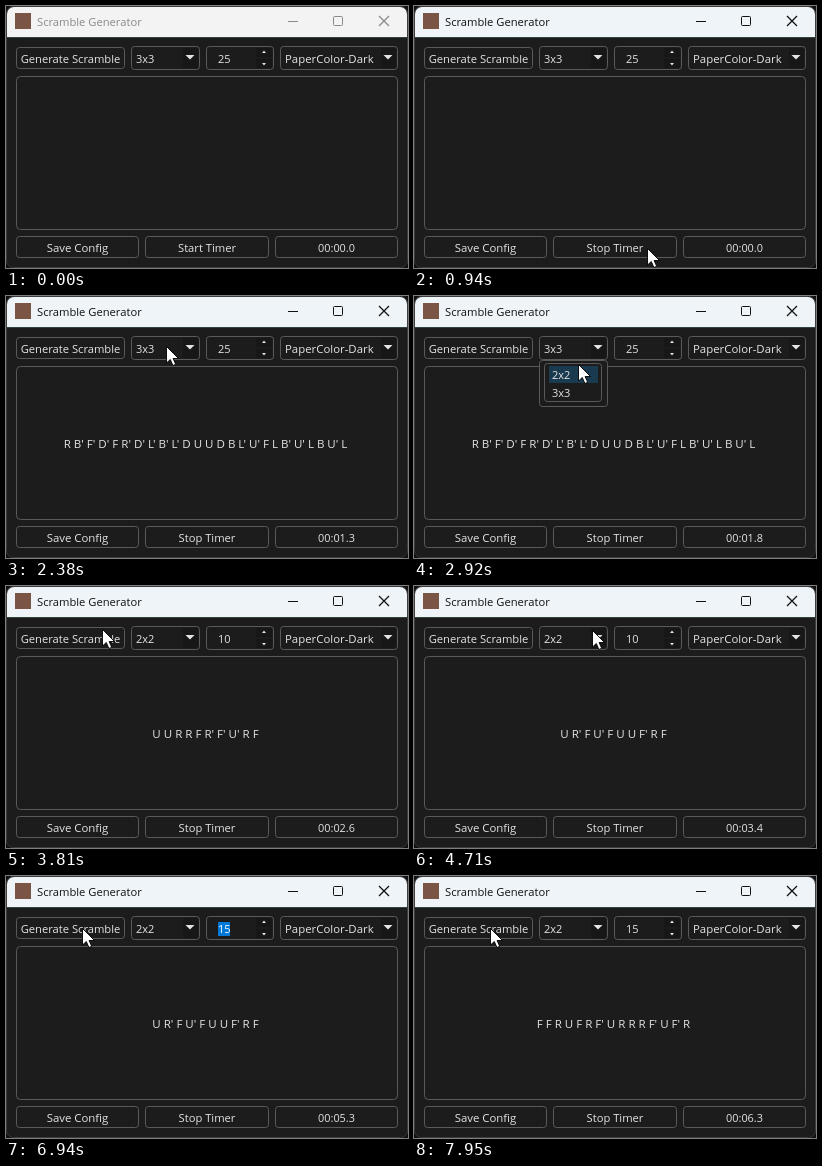
An HTML page with a canvas for the animation above (8000 ms loop, 402x262 px).

```html
<!DOCTYPE html>
<html lang="en">
<head>
<meta charset="utf-8">
<title>Scramble Generator</title>
<style>
html, body { margin: 0; width: 100%; height: 100%; overflow: hidden; background: #1c1c1c; }
canvas { display: block; width: 402px; height: 262px; }
</style>
</head>
<body>
<canvas id="stage" width="402" height="262"></canvas>
<script>
const ctx = document.getElementById('stage').getContext('2d');
const LOOP = 8000, REFRESH = 50, MOVE = 600;
const BODY = '#1c1c1c', EDGE = '#5a5a5a', INK = '#e4e4e4', DARK = '#171717';

// Moments of the clicks, in ms
const START = 846, OPEN = 2580, PICK = 3060, SPIN = 5330, LAST = 7060;

// Where the pointer goes: arrival time, x, y
const stops = [
  [-MOVE, 310, 290],
  [470, 233, 242],
  [1560, 88, 48],
  [2440, 165, 50],
  [2900, 164, 68],
  [3780, 96, 43],
  [5000, 259, 45],
  [6650, 76, 52]
];

const scrambles = [
  [0, ''],
  [1840, "R B' F' D' F R' D' L' B' L' D U U D B L' U' F L B' U' L B U' L"],
  [3670, "U U R R F R' F' U' R F"],
  [4080, "U R' F U' F U U F' R F"],
  [LAST, "F F R U F R F' U R R R F' U F' R"]
];

const clamp = (v, lo, hi) => Math.min(hi, Math.max(lo, v));
const smooth = p => p * p * (3 - 2 * p);

function pointerAt(t) {
  const next = stops.findIndex(s => s[0] > t);
  if (next < 0) return stops[stops.length - 1].slice(1);
  const [left, x0, y0] = stops[next - 1];
  const [arrive, x1, y1] = stops[next];
  const leave = Math.max(left, arrive - MOVE);
  const p = smooth(clamp((t - leave) / (arrive - leave), 0, 1));
  return [x0 + (x1 - x0) * p, y0 + (y1 - y0) * p];
}

function countAt(t) {
  if (t < PICK) return 25;
  return 10 + clamp(Math.floor((t - SPIN) / 170) + 1, 0, 5);
}

// The stopwatch runs a little slower than the playback.
function clockAt(t) {
  const tenths = Math.floor(Math.max(0, t - START) * 0.00887);
  return '00:' + (tenths / 10).toFixed(1).padStart(4, '0');
}

function text(str, x, y, size = 11.4, color = INK, align = 'left') {
  ctx.font = `${size}px "Open Sans", "Noto Sans", sans-serif`;
  ctx.textAlign = align;
  ctx.fillStyle = color;
  ctx.fillText(str, x, y);
}

function fill(color, x, y, w, h) {
  ctx.fillStyle = color;
  ctx.fillRect(x, y, w, h);
}

function frame(x, y, w, h, r = 3, color = EDGE) {
  ctx.strokeStyle = color;
  ctx.lineWidth = 1;
  ctx.beginPath();
  ctx.roundRect(x + 0.5, y + 0.5, w - 1, h - 1, r);
  ctx.stroke();
}

function poly(color, points) {
  ctx.beginPath();
  points.forEach(([x, y]) => ctx.lineTo(x, y));
  ctx.closePath();
  ctx.fillStyle = color;
  ctx.fill();
}

function triangle(x, y, half, height) {
  poly(INK, [[x - half, y], [x + half, y], [x, y + height]]);
}

function button(label, x, y, w, size) {
  frame(x, y, w, 22);
  text(label, x + w / 2, y + 16, size, INK, 'center');
}

function combo(label, x, w, size) {
  const right = x + w;
  frame(x, 40, w, 24);
  fill(DARK, right - 17, 42, 15, 20);
  triangle(right - 10, 49, 4.5, 4.5);
  text(label, x + 5, 57, size);
}

function spinBox(value, selected) {
  frame(200, 40, 68, 24);
  fill(DARK, 250, 42, 16, 9);
  fill(DARK, 250, 53, 16, 9);
  triangle(258, 47, 2, -2.5);
  triangle(258, 57, 2, 2.5);
  if (selected) fill('#0078d7', 212, 46, 12, 14);
  text(value, 212, 57, 11, selected ? '#fff' : INK);
}

function popup(row) {
  fill(BODY, 125, 64, 69, 47);
  frame(125, 64, 69, 47);
  frame(130, 67, 58, 39);
  fill('#1a3a50', 135, 70 + row * 18, 49, 17);
  ['2x2', '3x3'].forEach((label, i) => text(label, 138, 83 + i * 18, 11));
}

function titleBar(active) {
  const ink = active ? '#111' : '#8a8a8a';
  ctx.beginPath();
  ctx.roundRect(1, 1, 400, 30, [7, 7, 0, 0]);
  ctx.fillStyle = active ? '#eff4f9' : '#f3f3f3';
  ctx.fill();
  fill('#33443f', 1, 31, 400, 1);
  fill('#7a5545', 9, 7, 16, 16);
  text('Scramble Generator', 31, 20, 11.2, ink);
  fill(ink, 282, 15, 10, 1);
  frame(327, 10, 10, 10, 1, ink);
  ctx.beginPath();
  ctx.moveTo(373, 10);
  ctx.lineTo(383, 20);
  ctx.moveTo(383, 10);
  ctx.lineTo(373, 20);
  ctx.lineWidth = 1.3;
  ctx.stroke();
}

function arrow(x, y) {
  ctx.save();
  ctx.translate(Math.round(x) + 0.5, Math.round(y) + 0.5);
  ctx.lineJoin = 'round';
  poly('#fff', [[0, 0], [0, 16.5], [3.8, 13], [6.4, 19], [9.2, 17.8], [6.6, 12], [12, 12]]);
  ctx.strokeStyle = '#000';
  ctx.lineWidth = 0.9;
  ctx.stroke();
  ctx.restore();
}

function draw(t) {
  const running = t >= START;
  const [x, y] = pointerAt(t);
  const scramble = scrambles.filter(s => s[0] <= t).pop()[1];

  fill('#101010', 0, 0, 402, 262);
  ctx.beginPath();
  ctx.roundRect(1, 1, 400, 260, 7);
  ctx.fillStyle = BODY;
  ctx.fill();
  frame(0, 0, 402, 262, 7, '#3c3c3c');
  titleBar(running);

  button('Generate Scramble', 10, 41, 109, 11.2);
  combo(t < PICK ? '3x3' : '2x2', 125, 69, 11);
  spinBox(countAt(t), t >= SPIN && t < LAST);
  combo('PaperColor-Dark', 274, 118);

  frame(10, 70, 382, 154, 4);
  text(scramble, 199.5, 152, 11.55, INK, 'center');

  button('Save Config', 10, 230, 123);
  button(running ? 'Stop Timer' : 'Start Timer', 139, 230, 124, 11.2);
  button(clockAt(t), 269, 230, 123, 10.9);

  if (t >= OPEN && t < PICK) popup(y > 62 ? 0 : 1);
  arrow(x, y);
}

function tick() {
  const t = performance.now() % LOOP;
  draw(t - t % REFRESH);
  requestAnimationFrame(tick);
}
tick();
</script>
</body>
</html>
```
